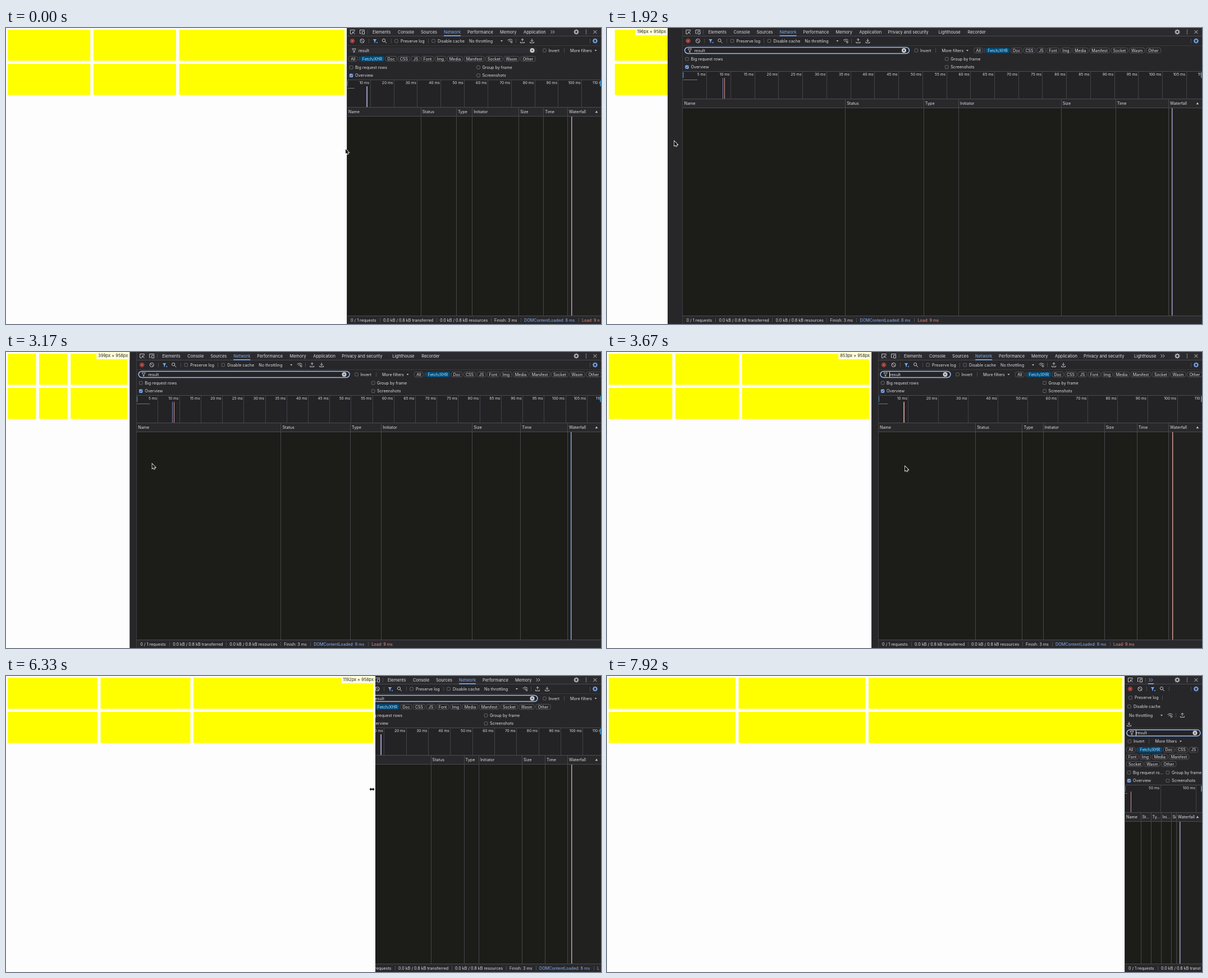
Recreate the animation shown at these times as an HTML page with a canvas. Size 1060 by 528 pixels, loop 8260 ms.

```html
<!DOCTYPE html>
<html lang="en">
<head>
<meta charset="utf-8">
<title>Resizing a docked network panel</title>
<style>
html, body { margin: 0; width: 100%; height: 100%; overflow: hidden; background: #fdfdfe; }
canvas { display: block; }
</style>
</head>
<body>
<canvas id="stage" width="1060" height="528"></canvas>
<script>
const c = document.getElementById('stage').getContext('2d');
const W = 1060, H = 528, LOOP = 8260, STEP = 1000 / 12;
const TEXT = '#dedee2', DIM = '#c4c4ca', LINE = '#4b4b50', BLUE = '#7cacf8', BAR = '#27272a';

// Keyframes: time, then values
const pageTrack = [[1083, 607], [1167, 560], [1333, 386.6], [1500, 235], [1667, 155], [1917, 108],
  [2167, 101], [2250, 101], [2667, 147.4], [3083, 178], [3667, 471], [3917, 615], [4000, 632],
  [4333, 634], [6250, 634], [6333, 658], [6417, 658], [6750, 846.4], [7167, 922]];
const panelTrack = [[1083, 607], [1167, 553], [1333, 382], [1500, 230], [1667, 160], [2167, 109],
  [2250, 109], [2667, 155], [3083, 190], [3667, 483], [3917, 620], [4000, 632], [4333, 634],
  [6417, 634], [6750, 834], [7167, 922]];
const mouseTrack = [[0, 605, 216], [167, 605, 214], [250, 604, 212], [500, 604, 212], [583, 608, 216],
  [1083, 609, 216], [1167, 540, 213], [1333, 367, 208], [1667, 140, 204], [2167, 100, 200],
  [2250, 100, 200], [2667, 178, 196], [3083, 215, 199], [3667, 531, 204], [3917, 630, 202],
  [4333, 635, 198], [4833, 635, 198], [4917, 639, 202], [5083, 639, 202], [5417, 641, 204],
  [6250, 641, 204], [6333, 652, 202], [6417, 652, 202], [6750, 899, 195], [7167, 925, 197],
  [7333, 930, 196], [7500, 985, 110], [7750, 1050, 4], [7833, 1075, -20]];

function at(track, t) {
  const i = track.findIndex(k => k[0] > t);
  if (i === 0) return track[0].slice(1);
  if (i < 0) return track[track.length - 1].slice(1);
  const a = track[i - 1], b = track[i], u = (t - a[0]) / (b[0] - a[0]);
  return a.slice(1).map((v, j) => v + (b[j + 1] - v) * u);
}

function rect(x, y, w, h, color) {
  c.fillStyle = color;
  c.fillRect(x, y, w, h);
}
const vline = (x, y0, y1, color = LINE, w = 1) => rect(Math.round(x), y0, w, y1 - y0, color);
const hline = (x, y, color = LINE) => rect(x, y, W - x, 1, color);

function text(s, x, y, color = TEXT, size = 7.2, align = 'left') {
  c.font = `${size}px Inter, sans-serif`;
  c.textAlign = align;
  c.fillStyle = color;
  c.fillText(s, x, y + size * 0.364);
}

function fitted(s, x, y, room) {
  c.font = '7.2px Inter, sans-serif';
  let out = s;
  for (let n = s.length - 1; n > 0 && c.measureText(out).width > room; n--) out = s.slice(0, n) + '...';
  text(out, x, y);
}

function pill(x, y, w, h, r, fill, stroke, lw = 1) {
  c.beginPath();
  c.roundRect(x, y, w, h, r);
  if (fill) { c.fillStyle = fill; c.fill(); }
  if (stroke) { c.strokeStyle = stroke; c.lineWidth = lw; c.stroke(); }
}

// Strokes a small SVG path centred on (x, y)
function icon(d, x, y, color = DIM, fill = false, lw = 1) {
  c.save();
  c.translate(x, y);
  c.strokeStyle = c.fillStyle = color;
  c.lineWidth = lw;
  const p = new Path2D(d);
  fill ? c.fill(p) : c.stroke(p);
  c.restore();
}
const ring = r => `M${r} 0A${r} ${r} 0 1 1 ${-r} 0A${r} ${r} 0 1 1 ${r} 0Z`;
const FUNNEL = 'M-3.2 -3H3.2L.8 .3V3.2H-.8V.3Z';
const DOWN = 'M-2 -1H2L0 1.5Z';
const TRAY = 'M-3.5 1.5V3.5H3.5V1.5';

function gear(x, y, color) {
  icon(ring(2.7), x, y, color, false, 1.6);
  for (let i = 0; i < 8; i++) {
    const a = i * Math.PI / 4;
    rect(x + 4 * Math.cos(a) - 0.7, y + 4 * Math.sin(a) - 0.7, 1.4, 1.4, color);
  }
}

function checkbox(x, y, on) {
  pill(x - 2.8, y - 2.8, 5.6, 5.6, 1, on ? BLUE : null, on ? BLUE : '#77777d', 0.8);
  if (on) icon('M-1.8 0L-.5 1.4L1.9 -1.5', x, y, '#222', false, 1);
}

function drawTabs(x) {
  const tabs = [['Elements', 46, 33], ['Console', 91, 29], ['Sources', 132, 29], ['Network', 173, 30],
    ['Performance', 215, 46], ['Memory', 273, 29], ['Application', 315, 40],
    ['Privacy and security', 366, 71], ['Lighthouse', 456, 39], ['Recorder', 508, 32]];
  const network = tabs[3];
  let shown = tabs.filter(tab => x + tab[1] + tab[2] <= 981);
  if (shown.length && !shown.includes(network)) {
    const last = shown.length > 1 ? shown.pop() : null;
    if (last) shown.push(['Network', last[1], 30]);
  }
  rect(x, 0, W - x, 14, '#2b2b2f');
  hline(x, 14);
  icon('M-1 3.5H-4V-3.5H3.5V-1M0 0L4 4M0 3V0H3', x + 10.5, 7);
  icon('M-2 3H-4V-3.5H4V-2M0 -1H4V3.8H0Z', x + 27.5, 7);
  vline(x + 37, 3, 11);
  let end = x + 35, mark = null;
  for (const [name, dx, w] of shown) {
    const active = name === 'Network';
    text(name, x + dx, 7, active ? BLUE : TEXT, 7.5);
    if (active) mark = [x + dx, w];
    end = x + dx + w;
  }
  if (shown.length < tabs.length) {
    icon('M-3.5 -2.8L-.7 0L-3.5 2.8M.3 -2.8L3.1 0L.3 2.8', end + 12, 7, mark ? DIM : BLUE);
    mark = mark || [end + 7, 10];
  }
  if (mark) rect(mark[0], 13, mark[1], 1.6, BLUE);
  gear(1016, 7, DIM);
  for (const dy of [-3, 0, 3]) icon(ring(0.8), 1033.5, 7 + dy, DIM, true);
  icon('M-3 -3L3 3M3 -3L-3 3', 1049.5, 7);
}

// Wrapping toolbar; returns its number of rows
function drawTools(x) {
  icon(ring(3.5), x + 10, 23, '#e8554d');
  rect(x + 8.2, 21.2, 3.6, 3.6, '#e8554d');
  icon(ring(3.6) + 'M-2.5 -2.5L2.5 2.5', x + 27.5, 23);
  vline(x + 39, 19, 27);
  icon(FUNNEL, x + 50, 23, BLUE, true);
  icon(ring(1), x + 54, 26, BLUE, true);
  icon('M1.6 -1A2.6 2.6 0 1 1 -3.6 -1A2.6 2.6 0 1 1 1.6 -1ZM.9 1L4 4', x + 67, 23);
  vline(x + 79, 19, 27);
  const items = [
    [68, (l, y) => { checkbox(l + 9.5, y); text('Preserve log', l + 17, y); vline(l + 66, y - 4, y + 4); }],
    [64, (l, y) => { checkbox(l + 7.5, y); text('Disable cache', l + 15, y); }],
    [73, (l, y) => { text('No throttling', l + 7, y); icon(DOWN, l + 65, y, DIM, true); }],
    [22, (l, y) => {
      icon('M-4.5 -1Q0 -5 4.5 -1M-2.7 1Q0 -1.5 2 .5', l + 7, y);
      icon(ring(1.4), l + 9.5, y + 2.2);
      vline(l + 17, y - 4, y + 4);
    }],
    [17, (l, y) => icon('M0 1.2V-4M-2.3 -1.7L0 -4L2.3 -1.7' + TRAY, l + 7, y)],
    [17, (l, y) => icon('M0 -4V1.2M-2.3 -1L0 1.2L2.3 -1' + TRAY, l + 7, y)]
  ];
  let left = x + 79, row = 0;
  for (const [w, draw] of items) {
    if (left + w > 1040) { left = x + 1; row++; }
    draw(left, 23 + row * 15.7);
    left += w;
  }
  vline(1040, 19, 27);
  gear(1049.5, 23, BLUE);
  return row + 1;
}

// Filter field and type chips; returns the y of the last chip row
function drawFilter(x, y, focused, caret) {
  const single = x < 515, tiny = x > 868;
  const right = single ? Math.min(613, x + 405) : tiny ? 1058 : 948;
  hline(x, y - 9, '#39393d');
  pill(x + 4, y - 5.5, right - x - 5, 11, 5.5, focused ? '#242427' : '#2f2f33', focused ? '#9bbef8' : null, 1.5);
  icon(FUNNEL, x + 13, y, DIM, false, 0.9);
  text('result', x + 21, y);
  if (caret) vline(x + 20, y - 4.5, y + 4.5, '#eee');
  icon(ring(4), right - 10.5, y, '#d5d5da', true);
  icon('M-1.6 -1.6L1.6 1.6M1.6 -1.6L-1.6 1.6', right - 10.5, y, '#29292c');

  const optX = tiny ? x + 9 : right + 11.5;
  if (tiny) y += 15;
  checkbox(optX, y);
  text('Invert', optX + 7, y);
  vline(optX + 34, y - 4, y + 4);
  text('More filters', optX + 45.5, y);
  icon(DOWN, optX + 91, y, DIM, true);

  const chips = [['All', 8.5], ['Fetch/XHR', 35], ['Doc', 12.5], ['CSS', 13.5], ['JS', 8.5], ['Font', 14],
    ['Img', 12], ['Media', 20], ['Manifest', 28.5], ['Socket', 22.5], ['Wasm', 20], ['Other', 19]];
  const start = single ? right + 118 : x + 7;
  let left = start;
  if (!single) y += 15;
  for (const [name, w] of chips) {
    if (!single && left + w > 1052) { left = start; y += 12.7; }
    const active = name === 'Fetch/XHR';
    pill(left - 3.7, y - 4.6, w + 7.4, 9.2, 3, active ? '#004a77' : null, active ? '#004a77' : '#5d5d64', 0.8);
    text(name, left + w / 2, y, active ? '#c2e7ff' : TEXT, 7, 'center');
    left += w + 9.9;
    if (name === 'All') { vline(left - 3.5, y - 4, y + 4); left += 2.6; }
  }
  return y;
}

function drawOptions(x, y) {
  const half = (W - x) / 2;
  const option = (name, l, yy, on) => {
    checkbox(l + 8, yy, on);
    fitted(name, l + 15, yy, half - 13);
  };
  option('Big request rows', x, y);
  option('Group by frame', x + half, y);
  option('Overview', x, y + 14.5, true);
  option('Screenshots', x + half, y + 14.5);
}

function drawOverview(x, top) {
  const perMs = (W - x) / 108.3;
  const step = [5, 10, 20, 50].find(s => s * perMs > 38) || 50;
  rect(x, top, W - x, 49, '#232326');
  hline(x, top);
  for (let ms = step; ms <= 115; ms += step) {
    const tick = x + ms * perMs;
    vline(tick, top, top + 49, '#424248');
    text(ms + ' ms', tick - 1.5, top + 6, TEXT, 6.6, 'right');
  }
  rect(x + 1, top + 15, 3 * perMs, 1, '#77777c');
  vline(x + 8.35 * perMs, top + 12, top + 49, '#8088b8');
  vline(x + 8.7 * perMs, top + 12, top + 49, '#d99a94');
  vline(x, top, top + 49, '#2d6f9c');
  rect(x, top + 2, 2, 10, '#2f86bd');
  rect(1058, top + 2, 2, 10, '#2f86bd');
}

function columnWidths(x) {
  const total = 1000 - x, min = 18;
  if (total < 6 * min) return [28.5, 18, 18, 18, 9.5, 0];
  const ideal = [0.335, 0.161, 0.072, 0.211, 0.112, 0.109].map(f => f * total);
  const slack = ideal.map(w => Math.max(0, w - min));
  const k = (total - 6 * min) / slack.reduce((a, b) => a + b, 0);
  return slack.map(s => min + s * k);
}

function drawTable(x, top) {
  const widths = columnWidths(x), names = ['Name', 'Status', 'Type', 'Initiator', 'Size', 'Time'];
  rect(x, top, W - x, 17, '#29292c');
  rect(x, top + 17, W - x, 513 - top - 17, '#1c1c19');
  hline(x, top);
  hline(x, top + 16);
  let left = x;
  widths.forEach((w, i) => {
    if (w > 6) {
      c.save();
      c.beginPath();
      c.rect(left, top, w, 17);
      c.clip();
      if (w < 12) text('Size', left + 3, top + 8.5);
      else fitted(names[i], left + 3, top + 8.5, w - 3);
      c.restore();
    }
    left += w;
    if (w) vline(left, top, 513, '#47474a');
  });
  rect(left + 1, top + 17, W - left - 1, 513 - top - 17, '#212120');
  text('Waterfall', left + 3, top + 8.5);
  icon('M-2.3 1.7H2.3L0 -2Z', 1052, top + 8.5, DIM, true);
  const mark = left + (left > 1000 ? 6 : 7);
  vline(mark, top + 17, 513, left > 1000 ? '#8aa6dc' : '#d99a94');
  vline(mark + 1, top + 17, 513, '#6b5a68');
}

function drawStatus(x) {
  rect(x, 513, W - x, 15, '#29292c');
  hline(x, 513);
  const items = [['0 / 1 requests', 7], ['0.0 kB / 0.8 kB transferred', 65], ['0.0 kB / 0.8 kB resources', 166],
    ['Finish: 3 ms', 263], ['DOMContentLoaded: 8 ms', 316, '#8ab4f8'], ['Load: 9 ms', 419, '#f28b82']];
  c.save();
  c.beginPath();
  c.rect(x, 513, 1057 - x, 15);
  c.clip();
  items.forEach(([s, dx, color], i) => {
    text(s, x + dx, 521, color);
    if (i) vline(x + dx - 6, 517, 525);
  });
  c.restore();
}

function drawPanel(x, focused, caret) {
  rect(x, 0, W - x, H, BAR);
  drawTabs(x);
  const rows = drawTools(x);
  const chipsY = drawFilter(x, 40 + (rows - 1) * 15.4, focused, caret);
  drawOptions(x, chipsY + 15.2);
  const top = Math.round(chipsY + 37.4);
  drawOverview(x, top);
  drawTable(x, top + 49);
  drawStatus(x);
  vline(x, 0, H, '#3d3d41');
}

function drawPage(w, showSize) {
  rect(0, 0, w, H, '#fdfdfe');
  const fr = (w - 18) / 4, gap = 5.5;
  const cells = w < 165 ? [[14, w - 14]]
    : [[3, fr], [3 + fr + gap, fr], [3 + 2 * (fr + gap), 2 * fr]];
  for (const y of [3, 64]) for (const [x, cw] of cells) rect(x, y, cw, 55.5, '#ffff00');
  if (showSize) {
    const label = Math.round(w / 0.5522) + 'px × 958px';
    c.font = '7.4px Inter, sans-serif';
    const lw = c.measureText(label).width + 6;
    rect(w - lw, 0, lw, 13, '#ffffd8');
    text(label, w - 3, 6.5, '#222', 7.4, 'right');
  }
}

function drawMouse(x, y, resizing) {
  const d = resizing
    ? 'M-4.5 0L-1.5 -3V-1H1.5V-3L4.5 0L1.5 3V1H-1.5V3Z'
    : 'M0 0V8L1.9 6.4L3.2 9.2L4.5 8.6L3.3 5.9H5.8Z';
  icon(d, x, y, '#fff', false, 1.6);
  icon(d, x, y, '#000', true);
}

function draw(ms) {
  const t = Math.floor((ms + 5) / STEP) * STEP + 0.5;
  const [page] = at(pageTrack, t), [panel] = at(panelTrack, t), [mx, my] = at(mouseTrack, t);
  const focused = t > 416;
  const caret = focused && (t < 833 || t > 7900 || Math.floor((t - 833) / 500) % 2 === 1);
  const showSize = (t > 1166 && t < 5333) || (t > 6333 && t < 7900);
  const resizing = (t > 583 && t < 1166) || (t > 4916 && t < 7333);
  rect(0, 0, W, H, BAR);
  drawPanel(panel, focused, caret);
  drawPage(page, showSize);
  drawMouse(mx, my, resizing);
}

const begin = performance.now();
(function loop() {
  draw((performance.now() - begin) % LOOP);
  requestAnimationFrame(loop);
})();
</script>
</body>
</html>
```
